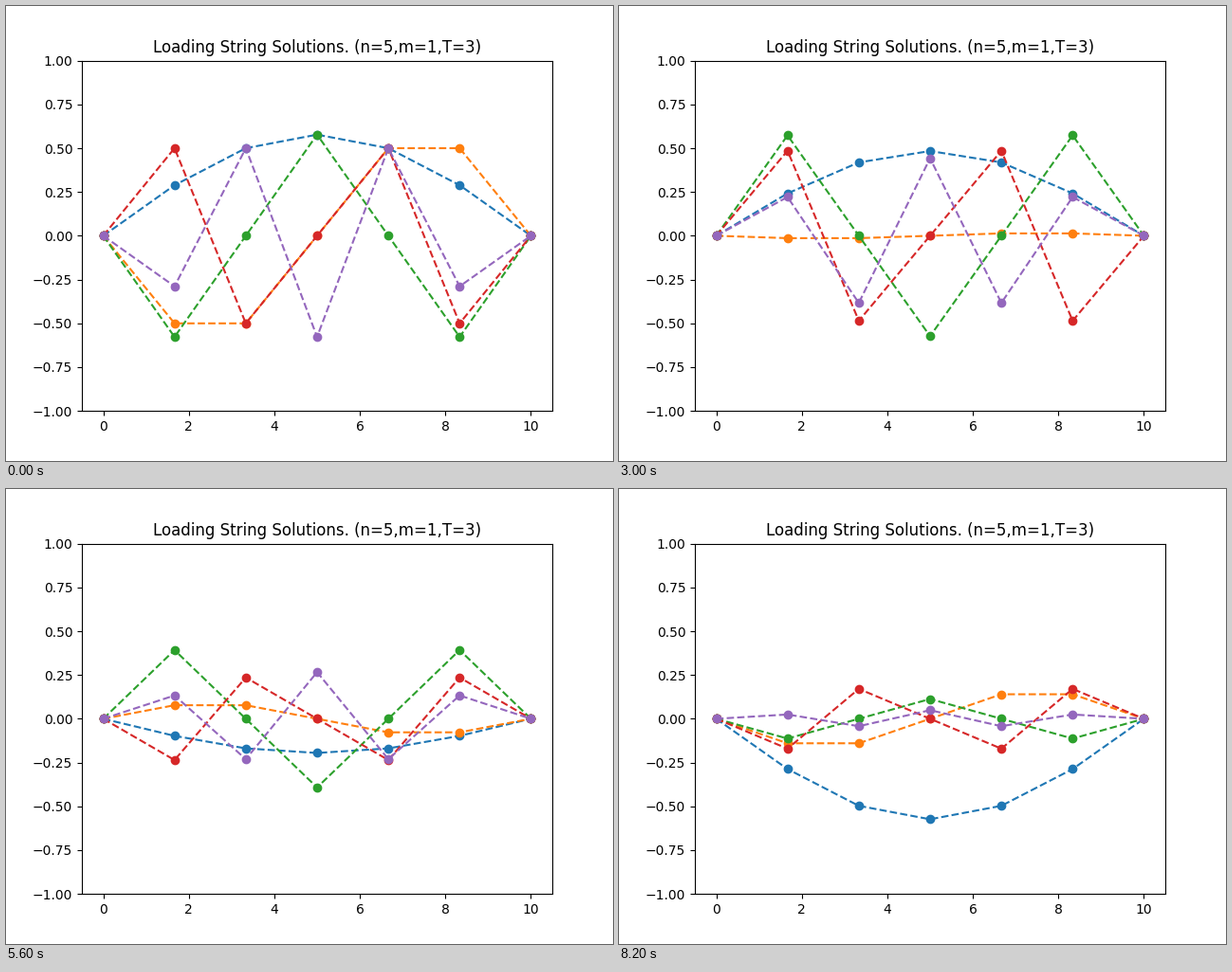
These frames come from a looping animation (640 px wide and 480 px high, 8.3 s). A matplotlib script:

```python
import numpy as np
import matplotlib.pyplot as plt
from matplotlib.animation import FuncAnimation

N, MASS, TENSION, LENGTH = 5, 1, 3, 10
FRAMES, INTERVAL, DT = 83, 100, 0.3

# Normal modes of a string loaded with N equal beads, ends fixed.
j = np.arange(N + 2)
k = np.arange(1, N + 1)
x = j * LENGTH / (N + 1)
signs = np.array([1, -1, -1, 1, -1])
shapes = np.sqrt(2 / (N + 1)) * signs[:, None] * np.sin(np.pi * np.outer(k, j) / (N + 1))
shapes[:, [0, -1]] = 0
spacing = LENGTH / N
omega = 2 * np.sqrt(TENSION / (MASS * spacing)) * np.sin(k * np.pi / (2 * (N + 1)))

fig, ax = plt.subplots(figsize=(6.4, 4.8), dpi=100)
lines = [ax.plot(x, shape, "--o")[0] for shape in shapes]
ax.set_xlim(-0.5, 10.5)
ax.set_ylim(-1, 1)
ax.set_title(f"Loading String Solutions. (n={N},m={MASS},T={TENSION})")


def update(frame):
    for line, shape, w in zip(lines, shapes, omega):
        line.set_ydata(shape * np.cos(w * frame * DT))
    return lines


anim = FuncAnimation(fig, update, frames=FRAMES, interval=INTERVAL,
                     repeat=True, repeat_delay=0)
plt.show()
```
